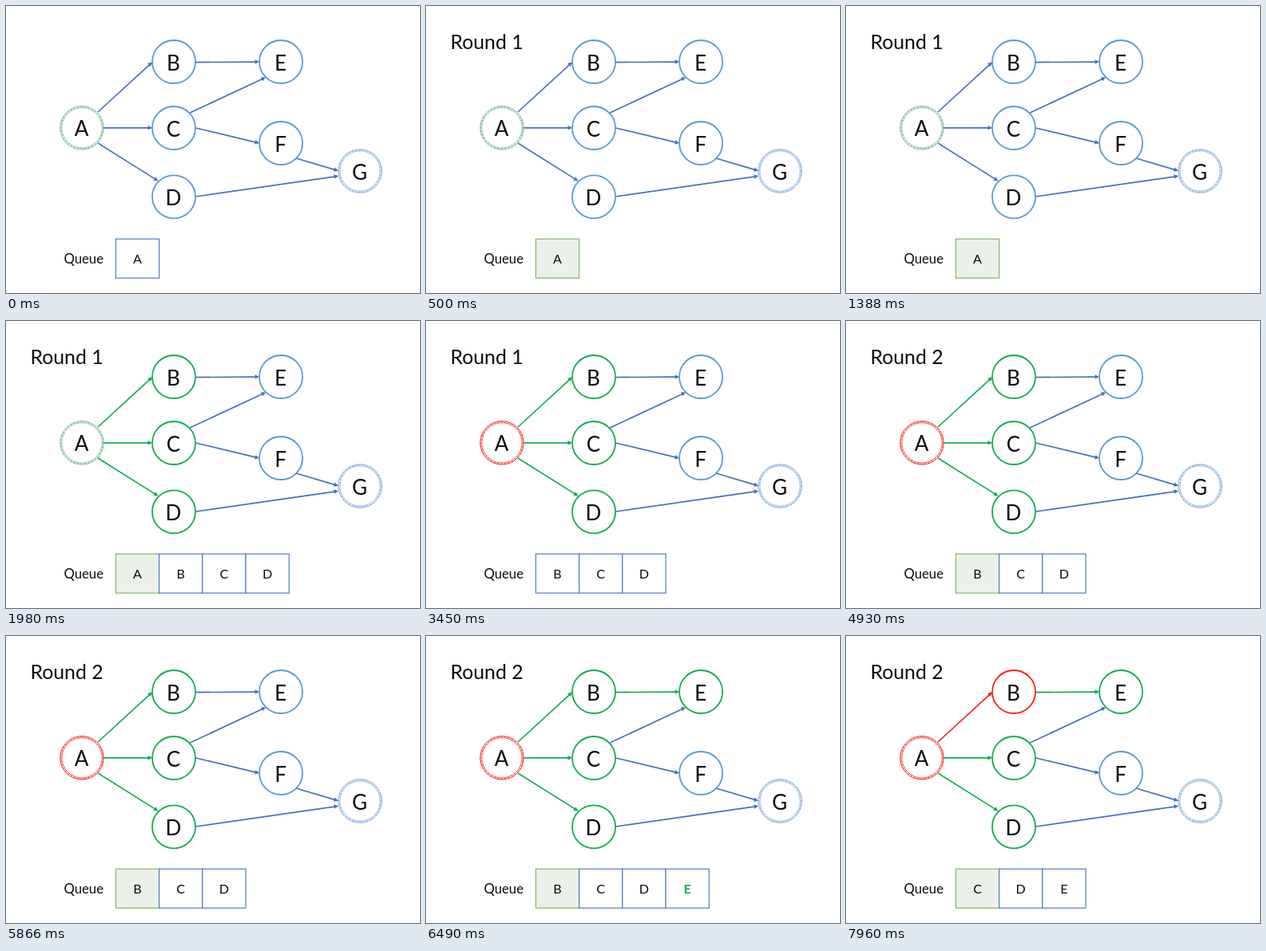
These frames come from a looping animation (518x360 px, 8000 ms). An HTML page:

```html
<!DOCTYPE html>
<html lang="en">
<head>
<meta charset="utf-8">
<title>Breadth-first search</title>
<style>
html, body { margin: 0; width: 100%; height: 100%; overflow: hidden; background: #fff; }
svg { display: block; width: 518px; height: 360px; font-family: Lato, Carlito, sans-serif; fill: #0b0b0b; }
</style>
</head>
<body>
<svg id="stage" viewBox="0 0 518 360"></svg>
<script>
const LOOP = 8000;
const BLUE = '#4472c4', RING = '#5b9bd5', GREEN = '#10ad50', RED = '#f8201c';

const nodes = {
  A: [95, 152.8], B: [210, 70], C: [210, 153], D: [210, 239.3],
  E: [344, 70], F: [344, 172], G: [443, 207]
};
const edges = {
  AB: [115, 133, 183, 70.3], AC: [122.5, 152.8, 183, 152.8], AD: [115, 172, 190.5, 219.5],
  BE: [237.5, 70.6, 317, 70], CE: [230, 134, 325, 89.5], CF: [237.5, 153, 317, 172],
  FG: [363, 191, 416, 206.7], DG: [237.5, 239, 416, 213.3]
};

// Each step lists what newly turns green or red; colours persist.
const steps = [
  { at: 0, queue: 'A' },
  { at: 500, round: 1, queue: 'A', active: true },
  { at: 1980, round: 1, queue: 'ABCD', active: true, green: ['B', 'C', 'D', 'AB', 'AC', 'AD'] },
  { at: 3450, round: 1, queue: 'BCD', red: ['A'] },
  { at: 4930, round: 2, queue: 'BCD', active: true },
  { at: 6490, round: 2, queue: 'BCDE', active: true, green: ['E', 'BE'], added: 'E' },
  { at: 7960, round: 2, queue: 'CDE', active: true, red: ['B', 'AB'] }
];

const text = (x, y, size, str, extra = 'text-anchor="middle"') =>
  `<text x="${x}" y="${y}" font-size="${size}" ${extra}>${str}</text>`;

const circle = (x, y, r, color, width, extra = '') =>
  `<circle cx="${x}" cy="${y}" r="${r}" fill="none" stroke="${color}" stroke-width="${width}" ${extra}/>`;

function arrow([x1, y1, x2, y2], color) {
  const angle = Math.atan2(y2 - y1, x2 - x1) * 180 / Math.PI;
  const len = Math.hypot(x2 - x1, y2 - y1);
  return `<g transform="translate(${x1} ${y1}) rotate(${angle})" fill="${color}">
    <path d="M0 0H${len - 4}" stroke="${color}" stroke-width="1.7"/>
    <path d="M${len} 0l-5.5 -2.8v5.6z"/></g>`;
}

function node(name, color) {
  const [x, y] = nodes[name];
  let ring;
  if (name === 'A' || name === 'G') {
    const start = name === 'A' && !color;
    const tint = color || (start ? '#72bd9b' : '#79a5da');
    const dash = start ? '#667f79' : tint;
    ring = circle(x, y, 27.2, tint, 1) + circle(x, y, 25.2, tint, 0.8) +
      circle(x, y, 26.2, dash, 0.9, 'stroke-dasharray="1.5 3"');
  } else {
    ring = circle(x, y, 27, color || RING, 1.8);
  }
  return ring + text(x - 0.5, y + 10.5, 26, name);
}

function cell(letter, i, step) {
  const x = 137.4 + 54.2 * i;
  const active = step.active && i === 0;
  const fresh = letter === step.added;
  return `<rect x="${x}" y="292.2" width="54.2" height="49" fill="${active ? '#ebf1e8' : '#fff'}"
    stroke="${active ? '#79b155' : BLUE}" stroke-width="1.1"/>` +
    text(x + 27.1, 323.2, 16, letter,
      `text-anchor="middle"${fresh ? ` fill="${GREEN}" font-weight="700"` : ''}`);
}

function draw(index) {
  const step = steps[index], colors = {};
  for (const { green = [], red = [] } of steps.slice(0, index + 1)) {
    for (const key of green) colors[key] = GREEN;
    for (const key of red) colors[key] = RED;
  }
  stage.innerHTML =
    Object.keys(nodes).map(key => node(key, colors[key])).join('') +
    Object.keys(edges).map(key => arrow(edges[key], colors[key] || BLUE)).join('') +
    (step.round ? text(30.5, 54.3, 24.8, 'Round ' + step.round, '') : '') +
    text(72.5, 323.2, 16.7, 'Queue', '') +
    [...step.queue].map((letter, i) => cell(letter, i, step)).join('');
}

const stage = document.getElementById('stage');
const begin = performance.now();
let shown = -1;

function tick() {
  const t = (performance.now() - begin) % LOOP;
  const index = steps.filter(step => step.at <= t).length - 1;
  if (index !== shown) draw(shown = index);
  requestAnimationFrame(tick);
}
tick();
</script>
</body>
</html>
```
